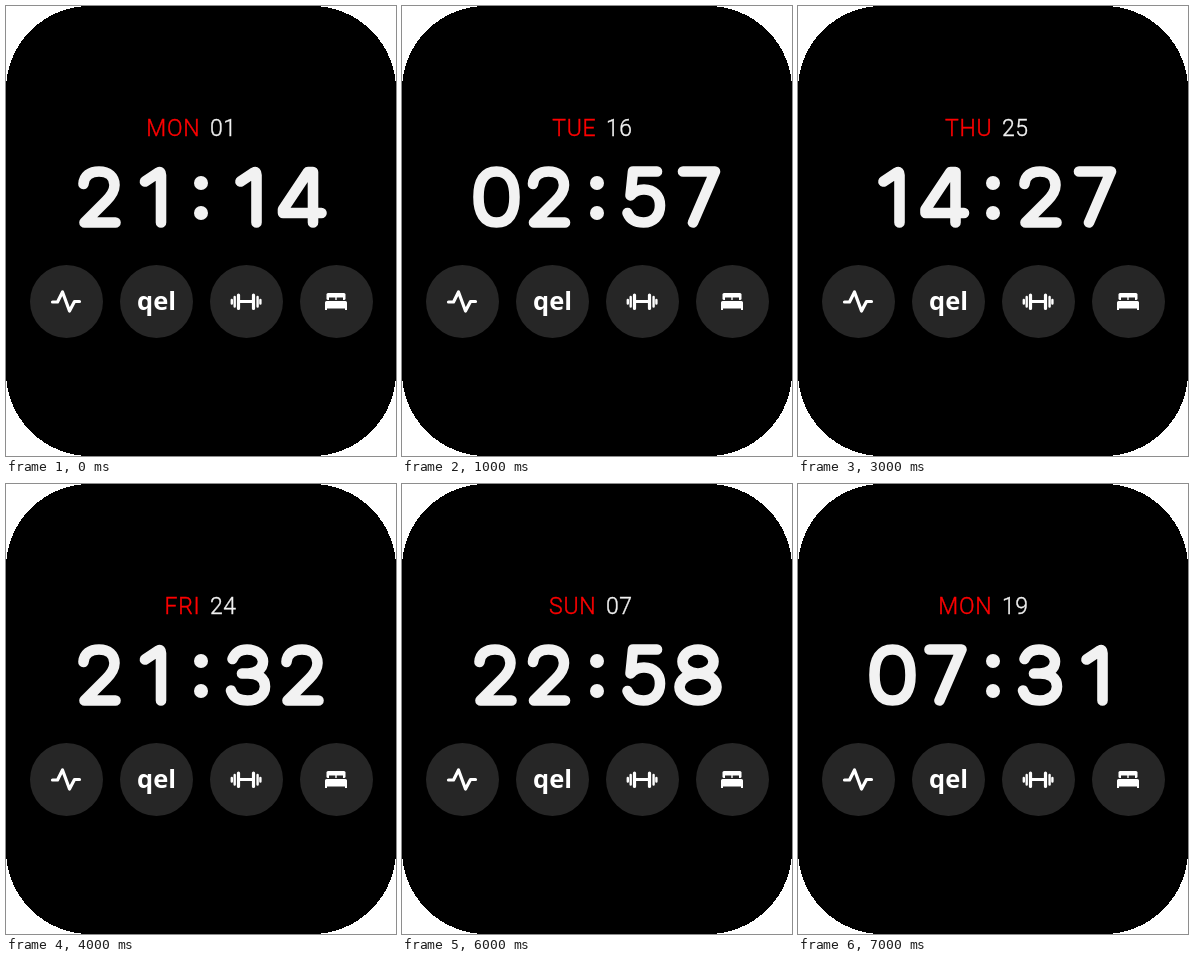
These frames come from a looping animation (390x450 px, 8000 ms). An HTML page:

```html
<!DOCTYPE html>
<html lang="en">
<head>
<meta charset="utf-8">
<style>
  html, body { margin: 0; width: 100%; height: 100%; overflow: hidden; background: #fff; }
  svg { display: block; }
  .line { fill: none; stroke: #fff; stroke-linecap: round; stroke-linejoin: round; }
  #time { stroke: #f2f2f2; stroke-width: 10.6; }
  .date { font: 300 23px Roboto, sans-serif; stroke-width: .4; }
  .label { font: 700 25.5px "Open Sans", sans-serif; }
</style>
</head>
<body>
<svg width="390" height="450" viewBox="0 0 390 450">
  <rect width="390" height="450" rx="84" shape-rendering="crispEdges"/>

  <g class="date">
    <text id="day" x="194.5" y="129.5" text-anchor="end" letter-spacing=".8" fill="#f00" stroke="#f00"></text>
    <text id="num" x="204" y="129.5" letter-spacing=".4" fill="#f2f2f2" stroke="#f2f2f2"></text>
  </g>

  <g id="time" class="line">
    <path/><path/><path/><path/>
  </g>
  <g fill="#f2f2f2">
    <circle cx="195" cy="177" r="7"/>
    <circle cx="195" cy="207" r="7"/>
  </g>

  <g fill="#262626">
    <circle cx="60.5" cy="295.5" r="36.5"/>
    <circle cx="150.5" cy="295.5" r="36.5"/>
    <circle cx="240.5" cy="295.5" r="36.5"/>
    <circle cx="330.5" cy="295.5" r="36.5"/>
  </g>
  <path class="line" stroke-width="3.2" d="M46.5 296H51.5L56.5 286L63.5 305L68.5 295.5H73.5"/>
  <text class="label" x="150.5" y="304" text-anchor="middle" fill="#fff">qel</text>
  <g class="line">
    <path stroke-width="3.2" d="M233 295.5H247M232.5 289V302.5M247.5 289V302.5"/>
    <path stroke-width="2.4" d="M228.7 291V300.5M251.6 291V300.5M225.8 294V297.5M254.4 294V297.5"/>
  </g>
  <g fill="#fff">
    <rect x="320.5" y="287" width="19" height="7" rx="1.5"/>
    <path d="M319 296.5q0-1.5 1.5-1.5h19q1.5 0 1.5 1.5V304h-2v-1.5h-18V304h-2z"/>
    <path fill="#262626" d="M323 291.5h6.3v2.5h-6.3zM330.7 291.5h6.3v2.5h-6.3z"/>
  </g>
</svg>
<script>
  // Centre lines of the digits, each in a cell about 43 by 62
  const DIGITS = [
    "M22.5 5.5C10 5.5 4.5 15 4.5 31S10 56.5 22.5 56.5S40.5 47 40.5 31S35 5.5 22.5 5.5Z",
    "M13.5 15.5L27 6.5Q29.5 5 29.5 9V56.5",
    "M5.5 18C6 10 12 5.5 21 5.5C30.5 5.5 36.5 11 36.5 19C36.5 25 34 29 28 35L6.5 56.5H37.5",
    "M5.5 15C8 9 13 5.5 20 5.5C29 5.5 36 11 36 17.5C36 25 29 29.5 21 29.5H15H21C31 29.5 38 34 38 42.5C38 51 30 56.5 20.5 56.5C12 56.5 6 53 4 46.5",
    "M32 56.5V6H27L2 43.5V47H40.5",
    "M34 5.5H10L7.5 29.5C11 25.5 15 23.5 21 23.5C31 23.5 37 30 37 39.5C37 50 30 56.5 20.5 56.5C12.5 56.5 7 53 4.5 47",
    "M33 9C30 6.5 27 5.5 23 5.5C11 5.5 5 15 5 33C5 49 11 56.5 22 56.5C32 56.5 38 50 38 40.5S32 25 22.5 25S6 31 6 40",
    "M6 5.5H38L16 56.5",
    "M21 5.5A15.5 12 0 0 1 21 29.5A15.5 12 0 0 1 21 5.5ZM21 29.5A18.5 13.5 0 0 1 21 56.5A18.5 13.5 0 0 1 21 29.5Z",
    "M10 53C13 55.5 16 56.5 20 56.5C32 56.5 38 47 38 29C38 13 32 5.5 21 5.5S5 12 5 21.5S11 37 20.5 37S37 31 37 22"
  ];
  const CELLS = [72, 125.5, 221, 275];
  const SCREENS = [
    "MON 01 2114", "TUE 16 0257", "WED 27 0231", "THU 25 1427",
    "FRI 24 2132", "SAT 13 1745", "SUN 07 2258", "MON 19 0731"
  ];

  const day = document.getElementById("day");
  const num = document.getElementById("num");
  const cells = document.querySelectorAll("#time path");
  cells.forEach((cell, i) => cell.setAttribute("transform", `translate(${CELLS[i]} 160)`));

  let shown = -1;
  function draw() {
    const index = Math.floor(performance.now() / 1000) % SCREENS.length;
    if (index !== shown) {
      shown = index;
      const [name, date, time] = SCREENS[index].split(" ");
      day.textContent = name;
      num.textContent = date;
      cells.forEach((cell, i) => cell.setAttribute("d", DIGITS[time[i]]));
    }
    requestAnimationFrame(draw);
  }
  draw();
</script>
</body>
</html>
```
